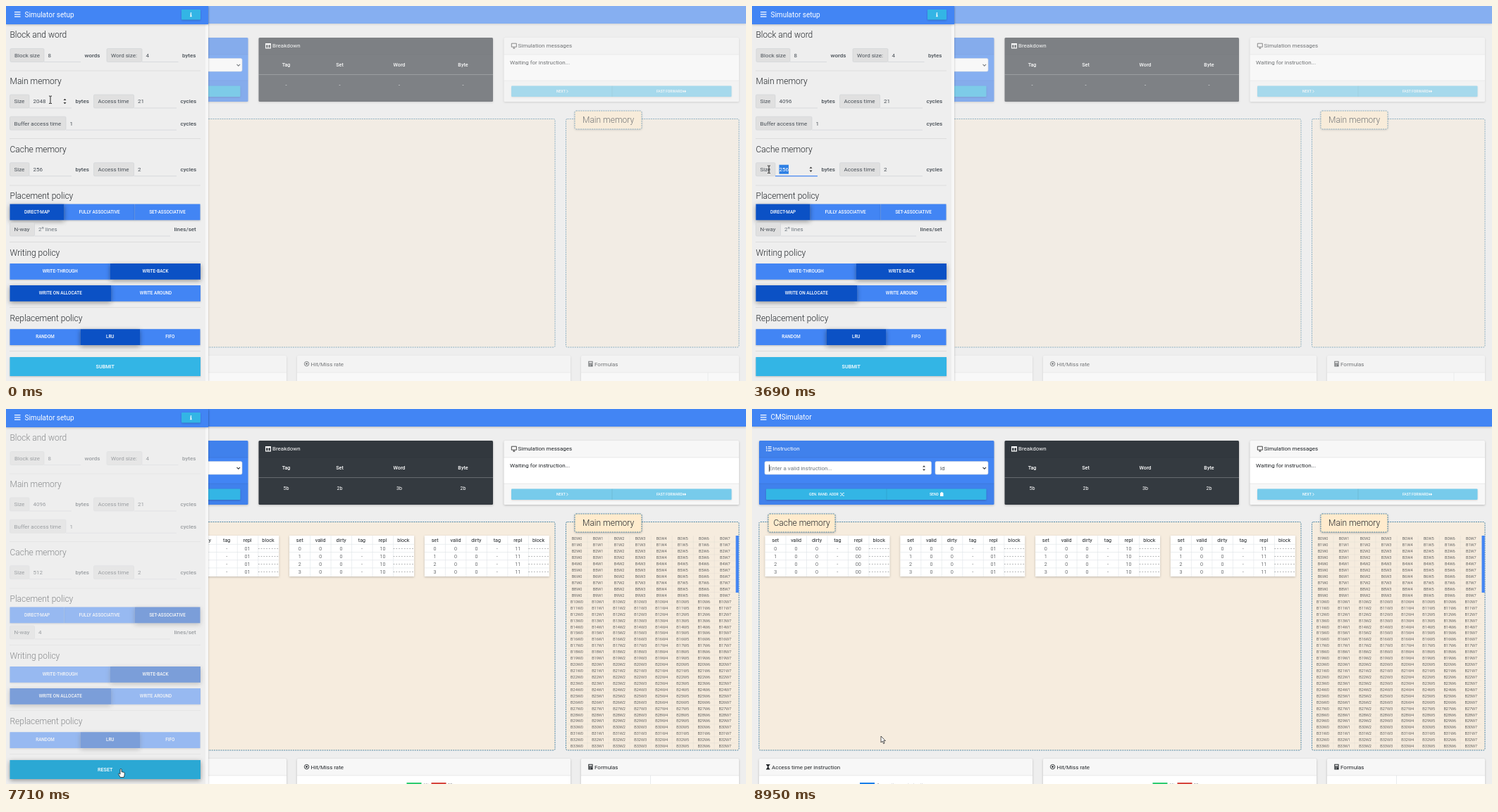
These frames come from a looping animation (1050 px wide and 533 px high, 9.09 s). An HTML page:

```html
<!DOCTYPE html>
<html lang="en">
<head>
<meta charset="utf-8">
<title>Cache simulator setup</title>
<style>
html, body { margin: 0; width: 100%; height: 100%; overflow: hidden; background: #eee; }
svg { display: block; width: 1050px; height: 533px; font-family: Roboto, sans-serif; }
text { white-space: pre; }
.card { filter: drop-shadow(0 1px 1.5px rgba(0,0,0,.22)); }
.low { filter: drop-shadow(0 1px 1px rgba(0,0,0,.2)); }
.high { filter: drop-shadow(0 2px 3px rgba(0,0,0,.38)); }
</style>
</head>
<body>
<svg id="stage" viewBox="0 0 1050 533"></svg>
<script>
const LOOP = 9090;
const BLUE = '#4285f4', INFO = '#33b5e5', INK = '#212529', GREY = '#495057';
const stage = document.getElementById('stage');
const $ = id => document.getElementById(id);

// ---- markup helpers
const rect = (x, y, w, h, fill, more = '') =>
  `<rect x="${x}" y="${y}" width="${w}" height="${h}" fill="${fill}" ${more}/>`;
// y is the middle of the capitals
const text = (x, y, s, size = 8, fill = GREY, more = '') =>
  `<text x="${x}" y="${(y + size * .355).toFixed(2)}" font-size="${size}" fill="${fill}" ${more}>${s}</text>`;
const mid = (x, y, s, size, fill, more = '') => text(x, y, s, size, fill, 'text-anchor="middle" ' + more);
const path = (d, fill, more = '') => `<path d="${d}" fill="${fill}" ${more}/>`;
const line = (x1, y1, x2, y2, color, w = 1, more = '') =>
  `<path d="M${x1} ${y1}L${x2} ${y2}" stroke="${color}" stroke-width="${w}" fill="none" ${more}/>`;
const range = n => [...Array(n).keys()];
const W300 = 'font-weight="300"', W500 = 'font-weight="500"';
const spin = (x, y, id = '') =>
  path(`M${x - 2} ${y - 1.4}l2 -2.4 2 2.4zM${x - 2} ${y + 1.4}l2 2.4 2 -2.4z`, '#333', id && `id="${id}"`);
const burger = () => path('M12 8h8.5v1.3h-8.5zM12 11.2h8.5v1.3h-8.5zM12 14.4h8.5v1.3h-8.5z', '#fff');

// ---- page behind the drawer
function card(x, y, w, h, fill, head, body) {
  return `<g class="card">${rect(x, y, w, h, fill, 'rx="1.5"')}</g>` +
    rect(x, y, w, 24, 'rgba(0,0,0,.03)') + line(x, y + 24, x + w, y + 24, 'rgba(0,0,0,.11)', .7) + head + (body || '');
}
const footer = (x, w) => rect(x, 106, w, 30, 'rgba(0,0,0,.03)') + line(x, 106, x + w, 106, 'rgba(0,0,0,.11)', .7);

function instruction() {
  const icon = path('M20 53h1v2h-1zM20 55.8h1.4v1.4h-1.4zM20 58.4h1.4v1.6h-1.4zM22.6 53.3h5v1.1h-5zM22.6 56h5v1.1h-5zM22.6 58.8h5v1.1h-5z', '#fff');
  return card(10, 45, 333.5, 91, BLUE, icon + text(29.5, 56.5, 'Instruction', 8, '#fff'),
    footer(10, 333.5) +
    rect(18, 74.5, 236.5, 18.5, '#fff', 'rx="2" stroke="#ced4da" stroke-width=".6"') +
    text(24, 84, 'Enter a valid instruction...', 8, '#6c757d') + spin(244, 84) +
    rect(24, 79, .8, 10, '#222', 'id="mainCaret"') +
    rect(260, 74.5, 75, 18.5, '#fff', 'rx="2" stroke="#ced4da" stroke-width=".6"') +
    text(267, 84, 'ld') + path('M327.5 82.8l2.3 2.3 2.3 -2.3', 'none', 'stroke="#343a40" stroke-width="1.1"') +
    `<g class="low">${rect(20, 113.5, 312.5, 15.5, INFO, 'rx="1"')}</g>` + line(191, 113.5, 191, 129, 'rgba(0,0,0,.08)') +
    text(81, 121.3, 'GEN. RAND. ADDR', 5.1, '#fff', W500) +
    path('M125 119.5h1.5l2.5 3.6h2M125 123.1h1.5l2.5 -3.6h2', 'none', 'stroke="#fff" stroke-width=".8"') +
    text(252, 121.3, 'SEND', 5.1, '#fff', W500) + path('M267 119.3h4.5v4.8h-4.5zM268 118.3h2.5v1h-2.5z', '#fff'));
}

function breakdown() {
  const xs = [397.5, 473.5, 558, 648.5];
  const icon = path('M368 53h8v7.4h-8zM369.1 55.2v4.1h2.4v-4.1zM372.5 55.2v4.1h2.4v-4.1z', '#fff', 'fill-rule="evenodd"');
  const row = vals => xs.map((x, i) => mid(x, 112.5, vals[i], 7.2, '#fff')).join('');
  return card(358.5, 45, 332.5, 91, '#343a40', icon + text(378, 56.5, 'Breakdown', 8, '#fff'),
    xs.map((x, i) => mid(x, 83.5, ['Tag', 'Set', 'Word', 'Byte'][i], 7.2, '#fff', W500)).join('') +
    line(358.5, 97.5, 691, 97.5, 'rgba(255,255,255,.3)', .8) +
    `<g class="before">${row(['-', '-', '-', '-'])}</g><g class="after">${row(['5b', '2b', '3b', '2b'])}</g>`);
}

function messages() {
  const icon = path('M717.3 53.2h7v5h-7zM719.3 60.2h3M720.8 58.2v2', 'none', 'stroke="#333" stroke-width=".9"');
  return card(706.5, 45, 333.5, 91, '#fff', icon + text(726.5, 56.5, 'Simulation messages', 8, INK),
    text(715, 80, 'Waiting for instruction...', 8, INK) + footer(706.5, 333.5) +
    `<g class="low" opacity=".65">${rect(717, 113.5, 312.5, 15.5, INFO, 'rx="1"')}</g>` +
    line(860, 113.5, 860, 129, 'rgba(0,0,0,.08)') +
    text(781, 121.3, 'NEXT', 5.1, '#fff', W500) + path('M795.5 119.3l1.8 2 -1.8 2', 'none', 'stroke="#fff" stroke-width=".8"') +
    text(923, 121.3, 'FAST FORWARD', 5.1, '#fff', W500) + path('M960.6 119.3l2.2 2 -2.2 2zM963 119.3l2.2 2 -2.2 2z', '#fff'));
}

function panel(x, w, bx, title) {
  const edge = 'rx="2" stroke="#3d7c9f" stroke-width=".9" stroke-dasharray="2 1.2"';
  return rect(x, 160.5, w, 324.5, '#f6ecde', edge) +
    `<g class="card">${rect(bx, 149, 95, 26, '#ffebcd', edge)}</g>`;
}

function cacheTable(n) {
  const x = 18.5 + n * 191.8, cols = range(6).map(i => x + 14.7 + i * 29.4);
  const names = ['set', 'valid', 'dirty', 'tag', 'repl', 'block'];
  let s = `<g class="card">${rect(x, 180, 177, 58, '#fff')}</g>`;
  range(5).forEach(i => s += line(x + (i + 1) * 29.5, 180, x + (i + 1) * 29.5, 238, '#dee2e6', .6));
  range(4).forEach(r => {
    const y = 198 + r * 11.2;
    s += line(x, y - 5.7, x + 177, y - 5.7, '#dee2e6', .6);
    [r, 0, 0, '-', n.toString(2).padStart(2, 0), '- - - - - - - -'].forEach((v, i) => s += mid(cols[i], y, v, 7.2, INK, W300));
  });
  return s + names.map((v, i) => mid(cols[i], 186, v, 7.2, INK)).join('');
}

function memoryRows() {
  let s = '';
  range(34).forEach(r => {
    const y = 184.5 + r * 8.93;
    s += line(795, y + 4.5, 1035, y + 4.5, 'rgba(120,130,140,.13)', .5);
    range(8).forEach(c => s += mid(810 + c * 30.05, y, `B${r}W${c}`, 5.6, INK, W300));
  });
  range(7).forEach(c => s += line(825 + c * 30.05, 180, 825 + c * 30.05, 484, 'rgba(120,130,140,.13)', .5));
  return s + rect(1035.5, 180, 4.2, 81, BLUE);
}

function bottomCards() {
  const glass = path('M20 505h5.5v1h-5.5zM20 511.4h5.5v1h-5.5zM20.6 506h4.3l-1.6 2.7 1.6 2.7h-4.3l1.6 -2.7z', INK);
  const eye = '<circle cx="426.6" cy="508.6" r="3.2" fill="none" stroke="#212529" stroke-width=".9"/><circle cx="426.6" cy="508.6" r="1.3" fill="#212529"/>';
  const calc = path('M826.3 504.8h6.3v7.6h-6.3zM827.3 505.8v1.6h4.3v-1.6zM827.3 508.5v1h1v-1zM829 508.5v1h1v-1zM830.7 508.5v1h1v-1zM827.3 510.4v1h1v-1zM829 510.4v1h1v-1z', INK, 'fill-rule="evenodd"');
  const legend = (x, color, s) => rect(x, 531, 21, 6, color) +
    `<text x="${x + 24}" y="535.6" font-size="6" fill="#666" style="font-family:'Liberation Sans',sans-serif">${s}</text>`;
  return card(10, 497, 388, 60, '#fff', glass + text(28, 508.8, 'Access time per instruction', 8, INK)) +
    card(413, 497, 388, 60, '#fff', eye + text(432.5, 508.8, 'Hit/Miss rate', 8, INK)) +
    card(816, 497, 224, 60, '#fff', calc + text(835, 508.8, 'Formulas', 8, INK)) +
    `<g class="before">${line(996, 521, 996, 533, '#dee2e6', .7)}</g><g class="after">` +
    line(914.5, 521, 914.5, 533, '#dee2e6', .7) + legend(153, '#1a7fe8', 'Access time per instruction') +
    legend(568.5, '#2ecc71', 'Hit') + legend(603.5, '#d6453d', 'Miss') + '</g>';
}

const page = `<g id="page">
  <g class="card">${rect(0, 0, 1050, 25, BLUE)}</g>${burger()}${text(26.5, 11.7, 'CMSimulator', 10, '#fff')}
  ${instruction()}${breakdown()}${messages()}
  ${panel(10, 769, 23)}${text(30.5, 161.7, 'Cache memory', 12, INK, W300)}
  ${panel(794.5, 245.5, 807)}${text(818, 161.7, 'Main memory', 12, INK, W300)}
  <g class="after">${range(4).map(cacheTable).join('')}${memoryRows()}</g>
  ${bottomCards()}</g>`;

// ---- drawer
function label(x, y, w, s) {
  return rect(x, y - 9.5, w, 19, '#e0e0e0', 'rx="1.5" stroke="#cfd2d5" stroke-width=".6"') + text(x + 6, y, s);
}
function field(x, y, w, end, name, value, unit, id) {
  const x0 = x + w;
  let s = label(x, y, w, name) + line(x0, y + 9.5, end, y + 9.5, '#cfd2d6', .7) + text(end + 5.5, y, unit, 8, GREY, W500);
  if (!id) return s + text(x0 + 5.5, y, value);
  return s + rect(x0, y + 8.9, end - x0, 1.2, BLUE, `id="${id}Focus"`) +
    text(x0 + 5.5, y, value, 8, GREY, `id="${id}Text"`) +
    rect(0, y - 6.5, 0, 13, '#2f80e4', `id="${id}Sel"`) + text(0, y, '', 8, '#fff', `id="${id}Hot"`) +
    rect(0, y - 5, .8, 10, '#222', `id="${id}Caret"`) + spin(end - 9.5, y, id + 'Spin');
}
function buttons(y, edges, names, on) {
  const one = i => {
    const x = edges[i], w = edges[i + 1] - x;
    return `<g class="${i === on ? 'high' : 'low'}" id="b${y}-${i}">` +
      rect(x, y, w, 22.8, i === on ? '#0b51c5' : BLUE) +
      mid(x + w / 2, y + 11, names[i], 6.3, '#fff', W500) + '</g>';
  };
  const order = range(names.length).filter(i => i !== on).concat(on);
  return order.map(one).join('');
}
const heads = [[41, 'Block and word'], [107, 'Main memory'], [204, 'Cache memory'], [269.5, 'Placement policy'], [351, 'Writing policy'], [443.5, 'Replacement policy']];
const drawer = `<g id="drawer">
  <g class="card">${rect(0, 0, 287, 533, '#eee')}</g>${rect(283, 26, 4, 507, '#f7f7f7')}
  <g class="card">${rect(0, 0, 287, 26, BLUE)}</g>${burger()}${text(26.5, 12, 'Simulator setup', 10, '#fff')}
  <g class="low">${rect(249, 5, 27, 14.5, INFO, 'rx="1"')}</g>
  ${path('M261.7 9.3h1.5v1.4h-1.5zM261.3 11.3h1.9v2.9h.5v1h-2.6v-1h.6v-1.9h-.4z', '#fff')}
  <g id="form">
  ${heads.map(h => text(5.5, h[0], h[1], 12, INK, W300)).join('')}
  ${[92, 188.5, 255, 335.5, 428.5, 490.5].map(y => line(5, y, 276, y, 'rgba(0,0,0,.1)', .7)).join('')}
  ${field(6, 70, 48, 106, 'Block size', '8', 'words')}${field(143, 70, 50, 244.5, 'Word size:', '4', 'bytes')}
  ${field(5.5, 135.5, 27.5, 93, 'Size', '', 'bytes', 'ram')}${field(124.5, 135.5, 57, 242, 'Access time', '21', 'cycles')}
  ${field(5.5, 166.7, 79.5, 242, 'Buffer access time', '1', 'cycles')}
  ${field(5.5, 232.2, 27.5, 93, 'Size', '', 'bytes', 'cache')}${field(124.5, 232.2, 57, 242, 'Access time', '2', 'cycles')}
  ${buttons(281.5, [5.5, 82.5, 182.5, 275.5], ['DIRECT-MAP', 'FULLY ASSOCIATIVE', 'SET-ASSOCIATIVE'], 0)}
  ${field(5.5, 317.5, 35, 233, 'N-way', '', 'lines/set', 'way')}
  ${buttons(366, [5.5, 148, 276], ['WRITE-THROUGH', 'WRITE-BACK'], 1)}
  ${buttons(397, [5.5, 149, 276], ['WRITE ON ALLOCATE', 'WRITE AROUND'], 0)}
  ${buttons(459.2, [5.5, 105.5, 190, 275.5], ['RANDOM', 'LRU', 'FIFO'], 1)}
  </g>
  <g id="submit">${rect(5.5, 499, 270.5, 27, INFO, 'id="submitBox"')}
  ${mid(140.7, 512.8, 'SUBMIT', 7.2, '#fff', W500 + ' id="submitText"')}</g></g>`;

const cursor = `<g id="cursor">
  <g id="ibeam">${path('M-2 -5h1.5l.5 .5 .5 -.5h1.5M-2 5.5h1.5l.5 -.5 .5 .5h1.5M0 -4.5v9.5', 'none', 'stroke="#111" stroke-width=".9"')}</g>
  <g id="arrow">${path('M0 0V9L2.1 7.1 3.6 10.6 5.1 10 3.6 6.6H6.4Z', '#fff', 'stroke="#111" stroke-width=".7"')}</g>
  <g id="hand">${path('M-1 .9Q-1 0 0 0T1 .9V4.2L4.4 4.9Q5.4 5.2 5.3 6.4L5 9.2 4.2 12H-.8L-3.3 7.7Q-3.7 6.4 -2.6 6.4L-1 7.7Z', '#fff', 'stroke="#111" stroke-width=".7"')}</g></g>`;

stage.innerHTML = rect(0, 0, 1050, 533, '#eee') + page + drawer + cursor;

// ---- timing
const clamp = v => Math.max(0, Math.min(1, v));
const ramp = (t, a, b) => clamp((t - a) / (b - a));
const smooth = u => u * u * (3 - 2 * u);
const mix = (a, b, u) => `rgb(${a.map((v, i) => Math.round(v + (b[i] - v) * u))})`;
const show = (id, on) => $(id).setAttribute('visibility', on ? 'inherit' : 'hidden');
const set = (id, o) => { for (const k in o) $(id).setAttribute(k, o[k]); };

// the CSS "ease" curve
function ease(x) {
  let lo = 0, hi = 1;
  for (let i = 0; i < 24; i++) {
    const s = (lo + hi) / 2, r = 1 - s;
    if (.75 * s * r * r + .75 * s * s * r + s ** 3 < x) lo = s; else hi = s;
  }
  const r = 1 - lo;
  return .3 * lo * r * r + 3 * lo * lo * r + lo ** 3;
}

// start, end, control point, end point
const moves = [
  [710, 960, 47, 138, 31, 140], [960, 1090, 34, 140, 38, 139],
  [2620, 3460, 171, 184, 58, 232], [3490, 3690, 41, 232, 24, 232],
  [4650, 5530, 193.5, 302.6, 235, 299], [5720, 6150, 210, 318, 172, 318],
  [6500, 7100, 171, 481, 163, 511.5], [8630, 8950, 167, 478, 183, 465]
];
function pointer(t) {
  let x = 63, y = 133;
  for (const [a, b, cx, cy, ex, ey] of moves) {
    if (t < a) break;
    const u = smooth(ramp(t, a, b)), r = 1 - u;
    x = r * r * x + 2 * r * u * cx + u * u * ex;
    y = r * r * y + 2 * r * u * cy + u * u * ey;
  }
  return [x, y];
}
const within = (v, a, b) => v >= a && v <= b;
function shape(t, x, y) {
  if (t >= 8260) return 'arrow';
  if (t < 2620 || within(t, 3480, 4660)) return 'ibeam';
  if (within(x, 5, 276) && [281.5, 366, 397, 459, 499].some(b => within(y, b, b + (b > 490 ? 27 : 22.8)))) return 'hand';
  const boxes = [[33, 93, 126], [182, 242, 126], [85, 242, 157], [33, 93, 222.7], [182, 242, 222.7], [41, 233, 308]];
  return boxes.some(([a, b, c]) => within(x, a, b) && within(y, c, c + 19)) ? 'ibeam' : 'arrow';
}

const CH = 4.5;
const fields = {
  ram: { x: 38.5, value: '2048', focus: 710, blur: 3490, drag: [710, 930], spinFrom: 0, keys: [[1760, '4'], [1880, '40'], [2060, '409'], [2640, '4096']] },
  cache: { x: 38.5, value: '256', focus: 3490, blur: 5480, drag: [3490, 3640], spinFrom: 3380, keys: [[4080, '5'], [4420, '51'], [4500, '512']] },
  way: { x: 46, value: '', hint: '2ⁿ lines', focus: 6170, blur: 7410, spinFrom: 5980, keys: [[6480, '4']] }
};
function drawField(id, f, t) {
  let value = f.value, last = f.focus;
  for (const [k, v] of f.keys) if (t >= k) { value = v; last = k; }
  const focused = t >= f.focus && t < f.blur;
  const n = f.drag && focused && t < f.keys[0][0] ? Math.round(ramp(t, ...f.drag) * value.length) : 0;
  const from = f.x + (value.length - n) * CH;
  set(id + 'Focus', { opacity: ramp(t, f.focus, f.focus + 150) * (1 - ramp(t, f.blur, f.blur + 150)) });
  $(id + 'Text').textContent = value || f.hint;
  set(id + 'Text', { fill: value ? GREY : '#6c757d' });
  set(id + 'Sel', { x: from, width: n * CH });
  $(id + 'Hot').textContent = n ? value.slice(-n) : '';
  set(id + 'Hot', { x: from });
  set(id + 'Caret', { x: f.x + value.length * CH });
  show(id + 'Caret', focused && !n && (t - last) % 1000 < 500);
  show(id + 'Spin', t >= f.spinFrom && t < f.blur);
}

function draw(t) {
  const done = t >= 7440, fade = ramp(t, 7440, 7590);
  set('page', { opacity: .6 + .4 * fade });
  document.querySelectorAll('.before').forEach(g => g.setAttribute('visibility', done ? 'hidden' : 'visible'));
  document.querySelectorAll('.after').forEach(g => g.setAttribute('visibility', done ? 'visible' : 'hidden'));
  show('mainCaret', within(t, 7930, 8429) || t >= 8930);

  set('drawer', { transform: `translate(${-290 * ease(ramp(t, 7742, 8040))} 0)` });
  set('form', { opacity: 1 - .5 * fade });
  for (const id in fields) drawField(id, fields[id], t);

  const pick = ramp(t, 5490, 5640), light = [66, 133, 244], dark = [11, 81, 197];
  [[0, 1 - pick], [2, pick]].forEach(([i, u]) => {
    const g = $('b281.5-' + i);
    g.setAttribute('class', u > .5 ? 'high' : 'low');
    g.firstElementChild.setAttribute('fill', mix(light, dark, u));
  });

  set('submit', { class: t >= 7040 ? 'high' : 'low' });
  set('submitBox', { fill: mix([51, 181, 229], [43, 168, 212], ramp(t, 7410, 7500)) });
  $('submitText').textContent = done ? 'RESET' : 'SUBMIT';

  const [x, y] = pointer(t), kind = shape(t, x, y);
  set('cursor', { transform: `translate(${x.toFixed(2)} ${y.toFixed(2)})` });
  ['ibeam', 'arrow', 'hand'].forEach(k => show(k, k === kind));
}

const start = performance.now();
function tick() {
  draw((performance.now() - start) % LOOP);
  requestAnimationFrame(tick);
}
tick();
</script>
</body>
</html>
```
